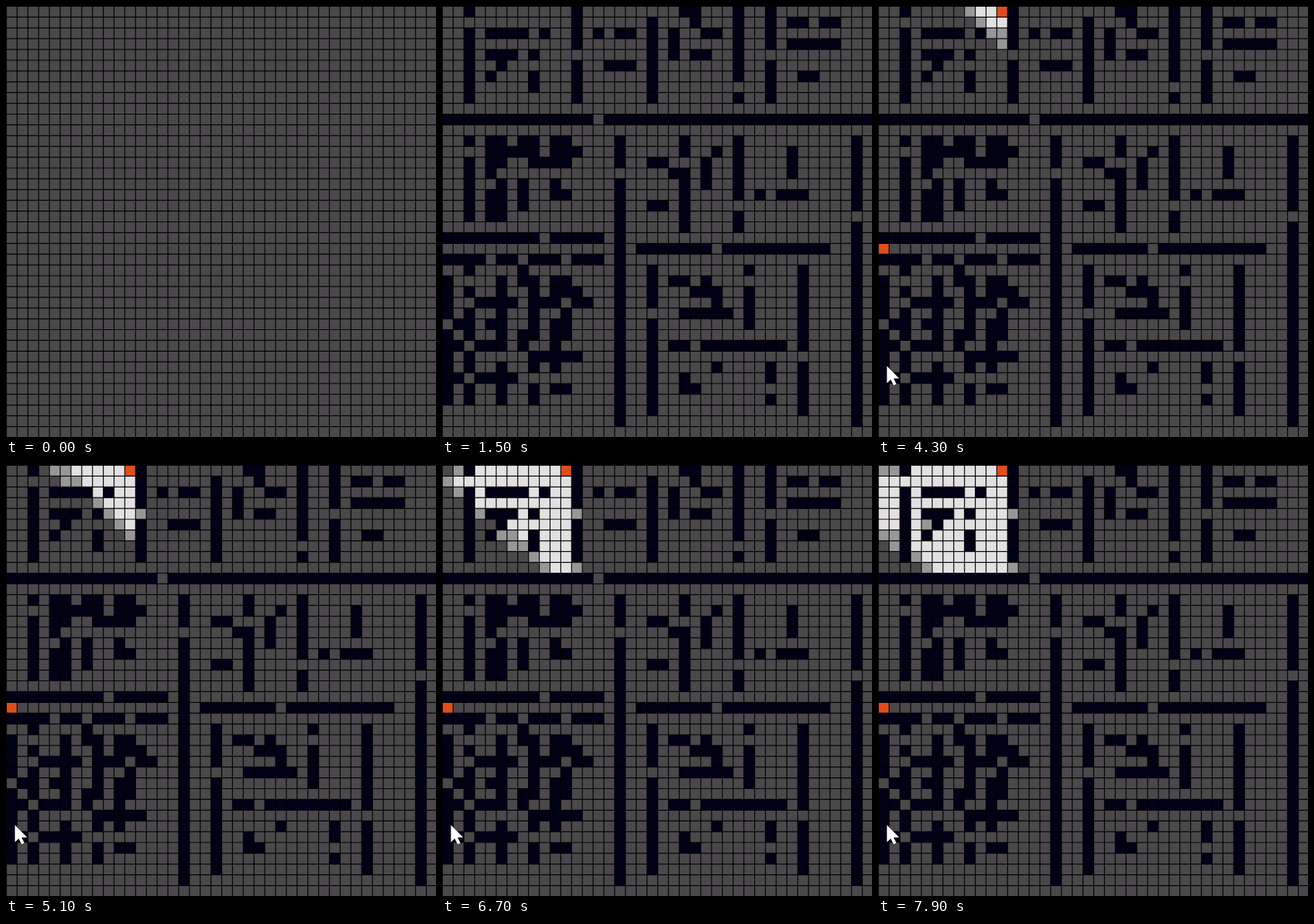
Write an HTML page with a canvas that moves like this. It is 595 px wide and 596 px high and loops after 8000 ms.

```html
<!DOCTYPE html>
<html lang="en">
<head>
<meta charset="utf-8">
<title>Path search on a grid</title>
<style>
  html, body { margin: 0; width: 100%; height: 100%; overflow: hidden; background: #000; }
  canvas { display: block; }
</style>
</head>
<body>
<canvas id="stage" width="595" height="596"></canvas>
<script>
const W = 595, H = 596, N = 40, PITCH = 14.9, LOOP = 8000, TICK = 100;
const COLOR = {
  floor: '#4a484a', wall: '#000016', line: '#000',
  open: '#989798', closed: '#e2e0e1', mark: '#e04d1b'
};
const START = { x: 11, y: 0 }, END = { x: 0, y: 22 };
const WALLS_AT = 1500, START_AT = 2300, END_AT = 3400, SEARCH_AT = 4000;
const ctx = document.getElementById('stage').getContext('2d');

const id = (x, y) => y * N + x;
const walls = new Set();

// A straight wall from a to b, left open at each gap
function row(y, a, b, ...gaps) {
  for (let x = a; x <= b; x++) if (!gaps.includes(x)) walls.add(id(x, y));
}
function column(x, a, b, ...gaps) {
  for (let y = a; y <= b; y++) if (!gaps.includes(y)) walls.add(id(x, y));
}
// Parallel walls of equal length, each with one door
function columns(a, b, doors) {
  for (const x in doors) column(+x, a, b, doors[x]);
}

function buildRooms() {
  row(10, 0, 39, 14);
  row(21, 0, 14, 9);
  row(22, 18, 35, 25);
  columns(0, 8, { 2: 1, 12: 4, 27: 7, 30: 4 });
  columns(12, 38, { 16: 15, 38: 19 });
  columns(12, 20, { 22: 14, 27: 18 });
  columns(24, 37, { 19: 28, 33: 32 });
  column(19, 1, 8);
  column(2, 12, 19, 13);
  column(28, 24, 29, 25);
  column(30, 33, 36, 35);
}

function buildTopLeft() {
  row(2, 4, 9, 8);
  row(4, 4, 8, 7);
  column(8, 6, 7);
  for (let i = 0; i < 2; i++) row(5 + i, 5 - i, 5 - i);
}

function buildMiddleLeft() {
  for (const x of [4, 5]) column(x, 12, 19, 20 - x);
  row(12, 7, 11, 9);
  row(13, 4, 12, 9);
  row(14, 8, 11);
  column(7, 16, 18);
  row(17, 10, 11);
  column(10, 16, 17);
}

function buildThicket() {
  column(0, 25, 36, 29);
  column(2, 24, 36, 25, 27, 31, 34);
  column(5, 25, 36, 32);
  column(8, 25, 36, 31, 34);
  column(10, 25, 33, 28);
  column(11, 25, 30, 27);
  for (const y of [24, 30]) column(7, y, y + 1);
  row(23, 0, 14, 4, 7, 11);
  row(26, 10, 12);
  row(27, 3, 13, 7, 11);
  row(29, 1, 5, 3);
  row(31, 1, 5, 2);
  row(32, 8, 12);
  row(34, 1, 6, 2);
  row(35, 10, 11);
}

function buildRight() {
  row(1, 32, 36, 34);
  row(2, 14, 17, 15);
  row(3, 32, 36);
  row(4, 21, 24, 22);
  row(5, 15, 17);
  row(17, 29, 33, 30);
  row(28, 22, 26);
  row(31, 21, 31, 23);
  column(32, 13, 15);
  for (const y of [14, 18]) row(y, 19, 20);
}

// Short seeded strokes in the rooms on the right
function scatter() {
  let seed = 7;
  const pick = (a, b) => {
    seed = (seed * 16807) % 2147483647;
    return a + Math.floor(seed / 2147483647 * (b - a + 1));
  };
  for (const top of [0, 13, 24, 33]) {
    for (let i = 0; i < 4; i++) {
      const x = pick(21, 25), y = top + pick(0, 2);
      if (i % 2) row(y, x, x + pick(0, 1));
      else column(x, y, y + 1);
    }
  }
  row(pick(5, 6), 33, 34);
}

buildRooms();
buildTopLeft();
buildMiddleLeft();
buildThicket();
buildRight();
scatter();

// A* with first-in-first-out ties; records the step at which cells open and close
function search(limit) {
  const opened = new Map([[id(START.x, START.y), 0]]), closed = new Map();
  const score = (x, y, g) => g + Math.abs(x - END.x) + Math.abs(y - END.y);
  const queue = [{ ...START, g: 0, f: score(START.x, START.y, 0) }];
  for (let step = 0; step < limit && queue.length; step++) {
    let best = 0;
    queue.forEach((n, i) => { if (n.f < queue[best].f) best = i; });
    const [cur] = queue.splice(best, 1);
    for (const [dx, dy] of [[1, 0], [-1, 0], [0, 1], [0, -1]]) {
      const x = cur.x + dx, y = cur.y + dy, key = id(x, y);
      if (x < 0 || y < 0 || x >= N || y >= N || walls.has(key) || opened.has(key)) continue;
      opened.set(key, step);
      queue.push({ x, y, g: cur.g + 1, f: score(x, y, cur.g + 1) });
    }
    closed.set(id(cur.x, cur.y), step + 1);
  }
  return { opened, closed };
}
const { opened, closed } = search(100);

// Keys are [time, ...values], joined by straight lines
function track(keys, t) {
  const i = keys.findIndex(k => t <= k[0]);
  if (i === 0) return keys[0].slice(1);
  if (i < 0) return keys.at(-1).slice(1);
  const [t0, ...from] = keys[i - 1], [t1, ...to] = keys[i];
  return from.map((v, j) => v + (to[j] - v) * (t - t0) / (t1 - t0));
}

const progress = [[4000, 0.5], [5100, 20.5], [7200, 66.5], [7900, 84.5]];
const visitPath = [[400, 35, 86], [600, 296, 221]];
const markPath = [
  [2100, 276, 14], [2300, 256, 6], [2600, 40, 425], [2700, 12, 460],
  [2800, 12, 460], [3000, 12.4, 484], [3200, 12.4, 484], [3400, 12.4, 504], [3600, 12.4, 498]
];

function fillCell(x, y, color) {
  ctx.fillStyle = color;
  ctx.fillRect(0.5 + x * PITCH, 0.5 + y * PITCH, PITCH, PITCH);
}

function drawLines() {
  ctx.strokeStyle = COLOR.line;
  ctx.lineWidth = 1.2;
  ctx.beginPath();
  for (let i = 0; i < N; i++) {
    const p = 0.5 + i * PITCH;
    ctx.moveTo(p, 0);
    ctx.lineTo(p, H);
    ctx.moveTo(0, p);
    ctx.lineTo(W, p);
  }
  ctx.stroke();
}

const arrow = new Path2D('M0 0V23.5L5.2 18.6L9.2 26.6L13 24.8L9.2 17H16.8Z');
function drawCursor([x, y]) {
  ctx.save();
  ctx.translate(x, y);
  ctx.strokeStyle = '#1c1c1c';
  ctx.lineWidth = 0.8;
  ctx.stroke(arrow);
  ctx.fillStyle = '#fff';
  ctx.fill(arrow);
  ctx.restore();
}

function draw(t) {
  ctx.fillStyle = COLOR.floor;
  ctx.fillRect(0, 0, W, H);
  const step = t < SEARCH_AT ? -1 : Math.floor(track(progress, t)[0]);
  for (let y = 0; y < N; y++) {
    for (let x = 0; x < N; x++) {
      const key = id(x, y);
      if (walls.has(key)) {
        if (t >= WALLS_AT) fillCell(x, y, COLOR.wall);
      } else if (closed.get(key) <= step) fillCell(x, y, COLOR.closed);
      else if (opened.get(key) <= step) fillCell(x, y, COLOR.open);
    }
  }
  if (t >= START_AT) fillCell(START.x, START.y, COLOR.mark);
  if (t >= END_AT) fillCell(END.x, END.y, COLOR.mark);
  drawLines();
  if (t >= 400 && t < 1100) drawCursor(track(visitPath, t));
  if (t >= 2100) drawCursor(track(markPath, t));
}

const began = performance.now();
function loop() {
  const t = (performance.now() - began) % LOOP;
  draw(Math.floor(t / TICK) * TICK);
  requestAnimationFrame(loop);
}
loop();
</script>
</body>
</html>
```
